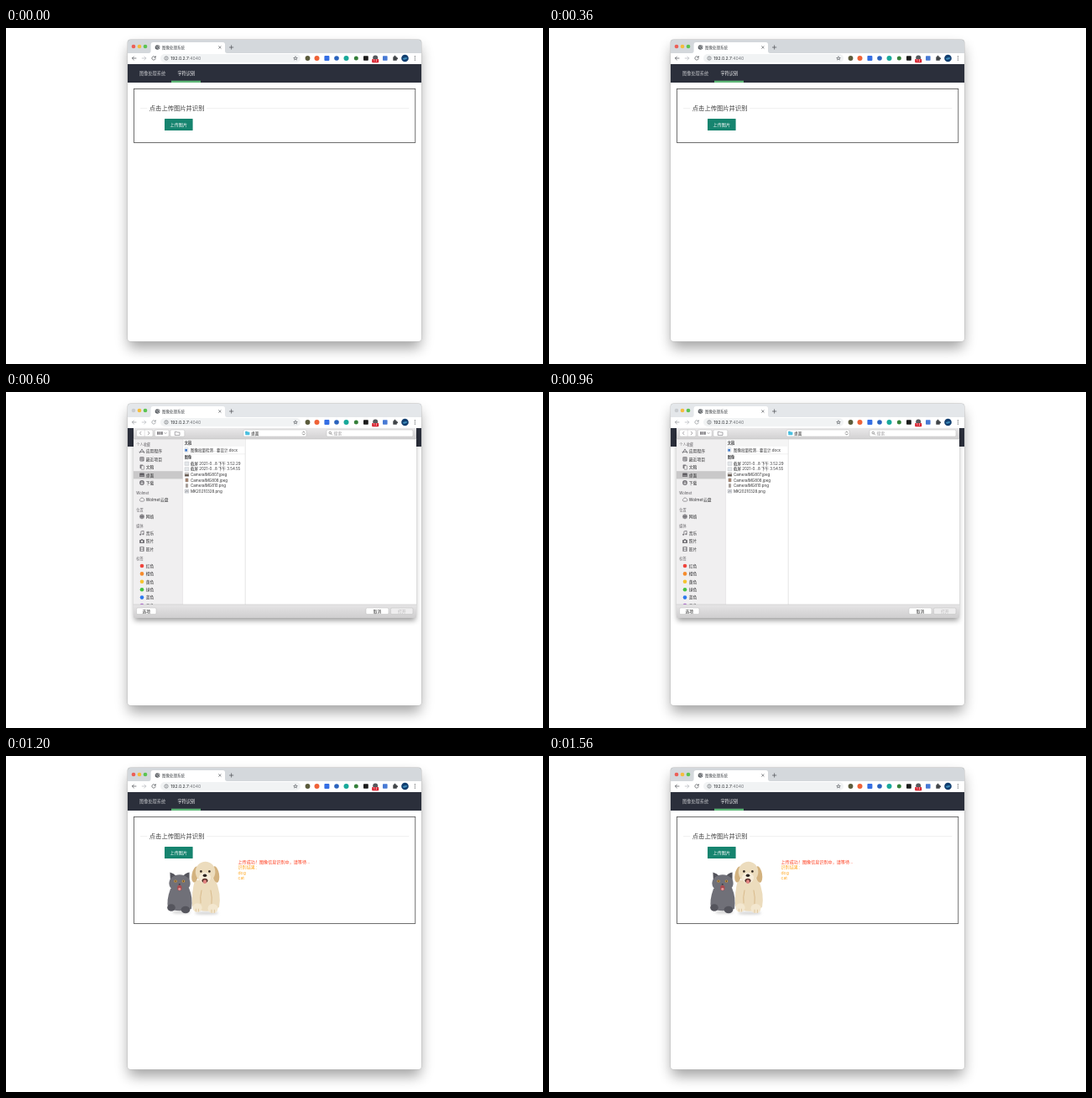
An HTML page for the animation above (1.8 s loop, 640x400 px).

```html
<!DOCTYPE html>
<html lang="zh-CN">
<head>
<meta charset="utf-8">
<title>图像处理系统</title>
<style>
  html, body { margin: 0; width: 100%; height: 100%; overflow: hidden; background: #fff; }
  svg { display: block; width: 640px; height: 400px; }
  text { font-family: Inter, "Noto Sans CJK SC", "Noto Sans CJK", sans-serif; white-space: pre; }
</style>
</head>
<body>
<svg id="stage" viewBox="0 0 640 400" xmlns="http://www.w3.org/2000/svg"></svg>
<script>
const STEP = 600, STEPS = 3;

// Drawing helpers
const rect = (x, y, w, h, fill, r = 0, more = '') =>
  `<rect x="${x}" y="${y}" width="${w}" height="${h}" rx="${r}" fill="${fill}" ${more}/>`;
const dot = (x, y, r, fill, more = '') =>
  `<circle cx="${x}" cy="${y}" r="${r}" fill="${fill}" ${more}/>`;
const oval = (x, y, rx, ry, fill, turn = 0) =>
  `<ellipse cx="${x}" cy="${y}" rx="${rx}" ry="${ry}" fill="${fill}" transform="rotate(${turn} ${x} ${y})"/>`;
const line = (d, color, w = 0.8) =>
  `<path d="${d}" fill="none" stroke="${color}" stroke-width="${w}" stroke-linecap="round" stroke-linejoin="round"/>`;
const shape = (d, fill) => `<path d="${d}" fill="${fill}"/>`;
const text = (x, y, size, fill, str, more = '') =>
  `<text x="${x}" y="${y}" font-size="${size}" fill="${fill}" ${more}>${str}</text>`;
const at = (x, y, body) => `<g transform="translate(${x} ${y})">${body}</g>`;
const during = (steps, body) => `<g data-steps="${steps}">${body}</g>`;
const bold = 'font-weight="600"', medium = 'font-weight="500"', middle = 'text-anchor="middle"';

const defs = `<defs>
  <filter id="soft" x="-20%" y="-20%" width="140%" height="140%"><feGaussianBlur stdDeviation="8"/></filter>
  <filter id="near" x="-20%" y="-20%" width="140%" height="140%"><feGaussianBlur stdDeviation="3"/></filter>
  <filter id="haze" x="-50%" y="-50%" width="200%" height="200%"><feGaussianBlur stdDeviation="1.6"/></filter>
  <linearGradient id="bar" x2="0" y2="1"><stop stop-color="#e9e8e9"/><stop offset="1" stop-color="#d2d1d2"/></linearGradient>
  <linearGradient id="foot" x2="0" y2="1"><stop stop-color="#e6e5e6"/><stop offset="1" stop-color="#cfcecf"/></linearGradient>
  <clipPath id="frame"><rect x="145" y="14" width="350" height="359" rx="3.5"/></clipPath>
  <clipPath id="side"><rect x="152" y="56" width="59" height="197"/></clipPath>
</defs>`;

const shadow =
  rect(146, 23, 348, 358, '#000', 5, 'opacity=".36" filter="url(#soft)"') +
  rect(144.6, 13.6, 350.8, 359.8, '#b9b9b9', 4);

function toolbarIcons(color) {
  return line('M155 36H150.4M152.4 34L150.4 36L152.4 38', color, 0.7) +
    line('M178 34.8A2.2 2.2 0 1 0 178.2 36.6M178.3 33.6V35.1H176.8', color, 0.7);
}

function browser() {
  const lights = first => [first, '#f5bd3d', '#5cc452']
    .map((c, i) => dot(152 + i * 7, 22, 2.35, c)).join('');
  const marks = [
    dot(359.5, 36, 2.9, '#5b5b3c'), dot(370.5, 36, 3, '#ef6237'),
    rect(379.4, 33, 6, 6, '#356fe4', 1), dot(394, 36, 2.8, '#2a63bd'),
    dot(405.5, 36, 3, '#18a99a'), dot(417.3, 36, 2.5, '#35803a'),
    rect(426, 33.2, 5.8, 5.6, '#1b1b1b', 0.8), dot(440.2, 35.4, 3, '#55595d'),
    rect(449, 33.2, 5.6, 5.6, '#4779d4', 0.7)
  ].join('');
  return rect(145, 14, 350, 17, '#d4d8dc') +
    during('1', rect(145, 14, 350, 17, '#e4e7ea') + lights('#c9cccf')) +
    during('0 2', lights('#ec5f57')) +
    shape('M170 30Q172.6 30 172.6 27V19.5Q172.6 17 175 17H258.5Q261 17 261 19.5V27Q261 30 263.6 30Z', '#fff') +
    dot(180.5, 23, 2.8, '#505459') +
    line('M178.7 22L180.3 22.6L180 24.1M181 20.9L181.6 22.2L182.7 22.6M181.4 24.7L182 23.8', '#fff', 0.6) +
    text(186, 24.7, 4.5, '#44484c', '图像处理系统') +
    line('M253.5 21.7L256.1 24.3M256.1 21.7L253.5 24.3', '#4c5054', 0.65) +
    line('M266.4 23H270.8M268.6 20.8V25.2', '#4c5054', 0.7) +
    rect(145, 30, 350, 13, '#fff') +
    rect(184, 31, 167, 10, '#f1f3f4', 5) +
    during('0 2', toolbarIcons('#4c5054')) + during('1', toolbarIcons('#8a8e92')) +
    line('M162.2 36H166.8M164.8 34L166.8 36L164.8 38', '#b4b7ba', 0.7) +
    dot(191, 36, 2.2, 'none', 'stroke="#5f6368" stroke-width=".6"') +
    line('M191 35.8V37.1M191 34.7V34.8', '#5f6368', 0.6) +
    text(196.3, 37.9, 5.1, '#26292c', '192.0.2.7<tspan fill="#72767a">:4040</tspan>') +
    shape('M345 33.1L345.8 35L347.9 35.2L346.3 36.6L346.8 38.6L345 37.5L343.2 38.6L343.7 36.6L342.1 35.2L344.2 35Z', '#5f6368') +
    shape('M345 34.6L345.4 35.6L346.4 35.7L345.6 36.4L345.9 37.4L345 36.8L344.1 37.4L344.4 36.4L343.6 35.7L344.6 35.6Z', '#f1f3f4') +
    marks +
    rect(436.2, 37, 8, 4.2, '#d81e2c', 0.8) + text(440.2, 40.4, 3.2, '#fff', '1.2', `${middle} ${bold}`) +
    rect(461.3, 34.2, 4.5, 4.5, '#3f4347', 0.5) + dot(463.5, 33.9, 1.1, '#3f4347') + dot(466, 36.3, 1.1, '#3f4347') +
    dot(475.5, 36, 4.3, '#123f70') + oval(475.5, 36.3, 2.7, 1.2, '#3d8ab9', -12) +
    [33.9, 36, 38.1].map(y => dot(487.4, y, 0.6, '#4c5054')).join('');
}

function page() {
  const box = h => rect(152.4, 72.4, 335.4, h, 'none', 0, 'stroke="#4a4a4a" stroke-width=".8"');
  return rect(145, 43, 350, 330, '#fff') +
    rect(145, 43, 350, 22, '#2b2f3b') +
    during('0 2',
      text(159, 55.7, 5.2, '#bfc1c5', '图像处理系统') +
      text(204.4, 55.7, 5.2, '#fff', '字符识别', medium) +
      rect(197, 62.7, 35, 2.3, '#5fb878') +
      line('M160.4 95.7H168M239.5 95.7H480', '#e4e4e4', 0.6) +
      text(170.8, 98.4, 7.3, '#3c3c3c', '点击上传图片并识别') +
      rect(189, 108, 33.6, 14, '#16846f', 0.6) +
      text(205.8, 117, 5.1, '#fff', '上传图片', `${middle} ${medium}`)) +
    during('0', box(64)) +
    during('2', box(127) + pets() + result());
}

function result() {
  const rows = ['识别结果：', 'dog', 'cat'];
  return text(276.5, 127.5, 5.1, '#ff3514', '上传成功！图像信息识别中，请等待...') +
    rows.map((s, i) => text(276.5, 134.4 + i * 6.4, 5.1, '#ffa51f', s)).join('');
}

function pets() {
  const cat = '#707078', shade = '#55555d', fur = '#ecdcbd', tan = '#d3b27f';
  return oval(209, 186, 11, 1.6, '#ccc').replace('/>', ' filter="url(#haze)"/>') +
    oval(239, 187, 14, 1.6, '#ccc').replace('/>', ' filter="url(#haze)"/>') +
    // cat
    shape('M196 158Q191 172 193 181Q205 187 221 182Q223 168 218 157Z', cat) +
    shape('M196 150L195.4 138.5Q200 139.5 203.4 143.5H210.5Q214 139 218.6 138.5L218.5 151Z', shade) +
    oval(207, 151.5, 12.6, 10.3, cat) +
    oval(197, 180.5, 4.8, 4.3, shade) + oval(214, 183, 5.4, 4.2, shade) +
    oval(202, 149, 1.8, 1.5, '#d39a3e') + oval(211.4, 149, 1.8, 1.5, '#d39a3e') +
    dot(202, 149, 0.7, '#222') + dot(211.4, 149, 0.7, '#222') +
    oval(206.8, 157, 2.7, 3.3, '#a94b50') + oval(206.8, 158.5, 1.6, 1.4, '#e59a9b') +
    oval(206.8, 152.8, 1.1, 0.8, '#35353b') +
    // dog
    shape('M225 148Q221 162 222 179Q238 190 254 180Q257 164 249 146Z', fur) +
    oval(225.6, 141, 4, 9.6, tan, 12) + oval(250, 141, 4, 9.8, tan, -10) +
    oval(237.6, 138, 11.8, 12.2, fur) + oval(237, 145, 7, 6.5, '#f6ecd9') +
    dot(232.4, 137.4, 1.3, '#2e241d') + dot(242.4, 137.4, 1.3, '#2e241d') +
    oval(237, 142.3, 2.3, 1.7, '#29221f') +
    oval(237, 148.3, 3.5, 2.6, '#5a302a') + oval(237, 149.7, 2.1, 2.4, '#df8380') +
    line('M233 160Q231 168 232 175M244 160Q246 168 245 176', tan, 0.8) +
    oval(228, 180.5, 5.6, 5.2, '#f3e7cf') + oval(246.5, 181.5, 6, 5.6, '#f3e7cf') +
    line('M226.4 182.2V185M229.4 182.2V185M245 183.2V186.4M248.4 183.2V186.4', tan, 0.6);
}

// File dialog
const ink = '#77757a';
const icons = {
  apps: line('M-2.6 2L0 -2.6L2.6 2M-3 .8H3', ink, 0.9),
  recent: rect(-2.6, -2.6, 5.2, 5.2, ink, 0.8) + line('M-1.5 -1H1.5M-1.5 .3H1.5M-1.5 1.5H.5', '#eee', 0.5),
  docs: rect(-2.4, -2.8, 3.7, 4.7, ink, 0.5) + rect(-0.9, -1.5, 3.5, 4.5, '#eee', 0.4, `stroke="${ink}" stroke-width=".6"`),
  desk: rect(-2.8, -2.3, 5.6, 4.5, '#5f5d62', 0.6) + line('M-1.8 1H1.8', '#ccc', 0.6),
  down: dot(0, 0, 2.9, ink) + line('M0 -1.5V1.4M-1.2 .3L0 1.5L1.2 .3', '#fff', 0.7),
  cloud: line('M-1.8 1.8A1.5 1.5 0 0 1 -1.8 -.9A2 2 0 0 1 2 -.9A1.4 1.4 0 0 1 2 1.8Z', ink, 0.7),
  net: dot(0, 0, 2.8, '#a4a2a6') + line('M-2.7 0H2.7M0 -2.7V2.7M-1.8 -1.8Q0 0 -1.8 1.8M1.8 -1.8Q0 0 1.8 1.8', '#57555a', 0.5),
  music: line('M-1.1 1.7V-2.1L2.1 -2.7V1.1', ink, 0.8) + dot(-1.9, 1.8, 1, ink) + dot(1.3, 1.3, 1, ink),
  photo: rect(-3, -1.6, 6, 4, ink, 0.6) + rect(-1.2, -2.4, 2.4, 1.2, ink) + dot(0, 0.4, 1.1, '#eee'),
  film: rect(-2.6, -2.7, 5.2, 5.4, ink, 0.5) + rect(-1.3, -2, 2.6, 1.7, '#eee') + rect(-1.3, 0.4, 2.6, 1.7, '#eee')
};
const heads = [[62, '个人收藏'], [120, 'Wolmet'], [140, '位置'], [159.7, '媒体'], [198.7, '标签']];
const places = [
  [70.5, 'apps', '应用程序'], [79.8, 'recent', '最近项目'], [89.2, 'docs', '文稿'],
  [98.8, 'desk', '桌面'], [108, 'down', '下载'], [128.2, 'cloud', 'Wolmet云盘'],
  [148.3, 'net', '网络'], [168, 'music', '音乐'], [177.5, 'photo', '照片'], [187, 'film', '影片']
];
const tags = [['#f0443c', '红色'], ['#f68b2c', '橙色'], ['#f5c32e', '黄色'],
  ['#45c243', '绿色'], ['#2c78ee', '蓝色'], ['#a455c8', '紫色']];
const files = ['截屏 2021-0...8 下午 3.52.29', '截屏 2021-0...8 下午 3.54.55',
  'CameraIMG807.jpeg', 'CameraIMG808.jpeg', 'CameraIMG810.png', 'MK20210328.png'];

const button = (x, y, w, h, label = '', color = '#2c2c2c', fill = '#fff') =>
  rect(x, y, w, h, fill, 1.5, 'stroke="#bdbcbd" stroke-width=".5"') +
  text(x + w / 2, y + h / 2 + 1.8, 4.8, color, label, middle);

function sidebar() {
  return `<g clip-path="url(#side)">` + rect(152, 56, 58.6, 198, '#f0eff0') +
    rect(152, 94.2, 58.6, 9.2, '#c9c8c9') +
    heads.map(([y, s]) => text(155.3, y + 1.5, 4.2, '#6c6a6e', s, medium)).join('') +
    places.map(([y, icon, s]) => at(162, y, icons[icon]) + text(166.8, y + 1.8, 4.8, '#2e2e30', s)).join('') +
    tags.map(([c, s], i) => {
      const y = 207 + i * 9.4;
      return dot(162, y, 2.3, c) + text(166.8, y + 1.8, 4.8, '#2e2e30', s);
    }).join('') + '</g>';
}

function fileList() {
  const thumbs = ['#e4e7ea', '#e4e7ea', '#675a50', '#a38069', '#9b9188', '#d5d8dd'];
  const widths = [5, 5, 5, 3.4, 2.6, 5];
  return rect(210.6, 56, 278.4, 197, '#fff') + line('M210.6 56V253M285.2 56V253', '#d5d4d5', 0.6) +
    rect(211, 56.3, 74, 8.6, '#f5f5f5') +
    text(212.8, 62.1, 4.2, '#454547', '文稿', bold) +
    rect(213, 66.3, 4, 5.4, '#f4f6f9', 0.2, 'stroke="#b9bec6" stroke-width=".4"') + rect(213.3, 67.9, 2.7, 2.7, '#3e77c8') +
    text(220, 70.8, 4.5, '#2e2e30', '图像批量检测...要设计.docx') +
    line('M211 73.8H285', '#e2e2e2', 0.5) +
    text(212.8, 79.4, 4.2, '#454547', '图像', bold) +
    files.map((s, i) => {
      const y = 85.3 + i * 6.56, w = widths[i];
      return rect(215.5 - w / 2, y - 2.2, w, 4.3, thumbs[i], 0.2, 'stroke="#b5b7ba" stroke-width=".4"') +
        (i === 2 ? rect(213.2, y - 1.9, 4.6, 1.4, '#ddd') : '') +
        (i === 5 ? line(`M214 ${y + 1}L215.3 ${y - 0.6}L216.8 ${y + 0.4}`, '#666', 0.5) : '') +
        text(220, y + 1.6, 4.5, '#2e2e30', s);
    }).join('');
}

function dialog() {
  return rect(153, 48, 335, 224, '#000', 1, 'opacity=".4" filter="url(#near)"') +
    rect(152, 43, 337, 226, '#e0dfe0', 1.5) +
    rect(152, 43, 337, 13, 'url(#bar)') +
    button(155.5, 45, 19.5, 8) + line('M165.2 45V53', '#c8c7c8', 0.5) +
    line('M161 47.2L159.4 49L161 50.8', '#88868a', 0.7) + line('M169.3 47.2L170.9 49L169.3 50.8', '#88868a', 0.7) +
    button(177.3, 45, 16.8, 8) +
    [180.2, 182.6, 185].map(x => rect(x, 47.2, 1.7, 3.6, '#737176')).join('') +
    line('M189 48.5L190.1 49.6L191.2 48.5', '#737176', 0.6) +
    button(195.8, 45, 17, 8) + line('M201.3 51V47.3H203.4L204 48H207V51Z', '#737176', 0.6) +
    button(283, 45, 75, 8) +
    rect(285.2, 46.8, 2.6, 2, '#37aed0', 0.4) + rect(285.2, 47.5, 5.2, 3.7, '#4bc0e0', 0.4) +
    text(292, 50.8, 4.8, '#2c2c2c', '桌面') +
    line('M353.5 48.2L354.7 47L355.9 48.2M353.5 49.9L354.7 51.1L355.9 49.9', '#444', 0.65) +
    button(382, 45, 103, 8) +
    dot(386.3, 48.6, 1.3, 'none', 'stroke="#666" stroke-width=".6"') + line('M387.3 49.6L388.5 50.9', '#666', 0.6) +
    text(390.6, 50.8, 4.8, '#a2a1a3', '搜索') +
    fileList() + sidebar() + line('M152 56H489', '#b9b8b9', 0.5) +
    shape('M152 253H489V267.5Q489 269 487.5 269H153.5Q152 269 152 267.5Z', 'url(#foot)') +
    line('M152 253H489', '#bebdbe', 0.5) +
    button(155.5, 257, 23.5, 7.6, '选项') + button(429, 257, 27, 7.6, '取消') +
    button(458.5, 257, 26.5, 7.6, '打开', '#b5b4b5', '#eeedee');
}

const stage = document.getElementById('stage');
stage.innerHTML = defs + shadow +
  `<g clip-path="url(#frame)">${browser()}${page()}${during('1', dialog())}</g>`;

for (const el of stage.querySelectorAll('[data-steps]')) {
  const on = el.dataset.steps.split(' ').map(Number);
  const keys = Array.from({ length: STEPS + 1 }, (_, i) => ({
    offset: i / STEPS,
    opacity: on.includes(i % STEPS) ? 1 : 0,
    easing: 'step-end'
  }));
  el.animate(keys, { duration: STEP * STEPS, iterations: Infinity });
}
</script>
</body>
</html>
```
